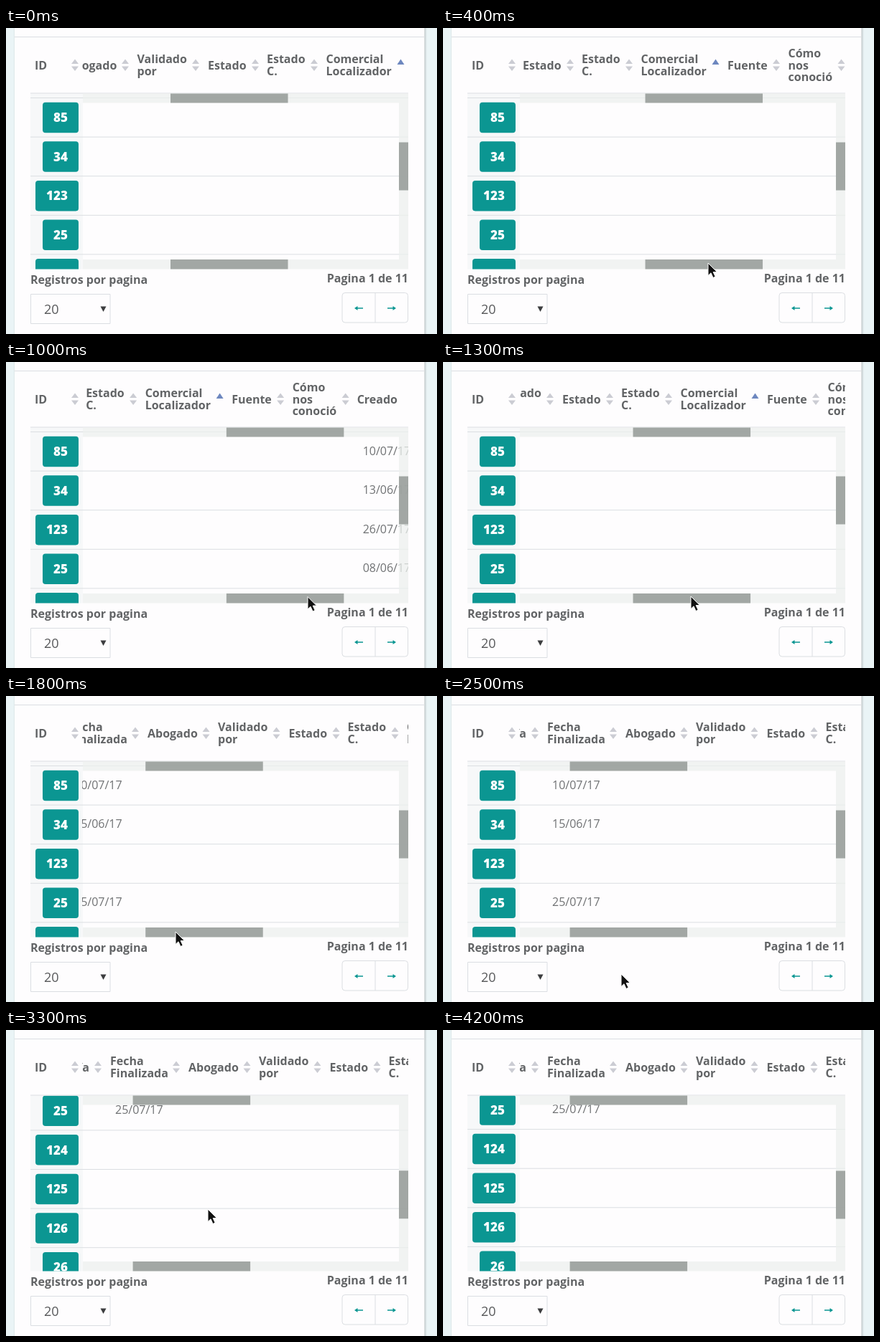
An HTML page that plays this animation: 600 by 427 pixels, repeating every 4300 ms.

```html
<!DOCTYPE html>
<html lang="es">
<head>
<meta charset="utf-8">
<style>
html, body { margin: 0; width: 100%; height: 100%; overflow: hidden; background: #eaf4f6; }
svg { display: block; width: 600px; height: 427px; font: 16px "Open Sans", sans-serif; fill: #707274; }
.b { font-weight: 700; fill: #626466; }
.chip { fill: #0b9692; }
.num { font-weight: 800; font-size: 17px; fill: #fff; text-anchor: middle; }
.line { fill: none; stroke: #dbdee2; }
.track { fill: #edf1ee; fill-opacity: .75; }
.thumb { fill: #959a97; fill-opacity: .85; }
.sort { fill: #cbccd3; }
.up { fill: #6d87bf; }
.card { fill: #fefdfe; filter: drop-shadow(1px 0 1.5px #0004); }
</style>
</head>
<body>
<svg viewBox="0 0 600 427">
  <clipPath id="head"><path d="M106 14H560V91H106z"/></clipPath>
  <clipPath id="body"><path d="M34 91.5H560V336.5H34z"/></clipPath>
  <clipPath id="cells"><path d="M106 91.5H560V336.5H106z"/></clipPath>

  <rect class="card" x="12" y="-9" width="570.5" height="450"/>
  <path class="line" d="M12 12.5H582"/>

  <text class="b" x="40" y="57.5">ID</text>
  <path class="sort" d="M91 50l5-6.5 5 6.5zM91 53.5h10l-5 6.5z"/>
  <g clip-path="url(#head)"><g id="heads"></g></g>

  <g clip-path="url(#body)">
    <path fill="#f7f8f9" d="M34 91H107V337H34z"/>
    <g id="rows"></g>
  </g>
  <g clip-path="url(#cells)"><g id="dates"></g></g>
  <path class="line" d="M34 91H560"/>

  <path class="track" d="M107 91.5H560V104.5H107zM107 323H560V336.5H107zM547 104.5H560V323H547z"/>
  <path class="thumb" id="hbar" d="M0 91.5H163.5V104.5H0zM0 323H163.5V336.5H0z"/>
  <path class="thumb" id="vbar" d="M547 0H560V67H547z"/>

  <text class="b" x="34" y="356.5">Registros por pagina</text>
  <text class="b" x="560" y="354.5" text-anchor="end">Pagina 1 de 11</text>
  <path class="line" d="M34.5 371.5H145V412.5H34.5z"/>
  <text x="53" y="399" font-size="18" fill="#58595b">20</text>
  <path fill="#3c3d3f" d="M131.5 388.5h8l-4 7.5z"/>
  <rect class="line" x="468" y="369.5" width="91.5" height="41.5" rx="4"/>
  <path class="line" d="M514 369.5V411"/>
  <path class="chip" d="M485 391l4.500-3v2.300h7.500v1.400h-7.500v2.300zM543 391l-4.500-3v2.300h-7.500v1.400h7.500v2.300z"/>

  <path id="cursor" fill="#111" stroke="#fff" d="M0 0V17.500L4 13.800 7 20.500 10.200 19 7.200 12.600H12.500z"/>
</svg>
<script>
const LOOP = 4300, STEP = 100, ROW_H = 54.6, TOP = 97.5;
const $ = id => document.getElementById(id);
const text = (x, y, s, cls = "", anchor = "start") =>
  `<text x="${x}" y="${y}" class="${cls}" text-anchor="${anchor}">${s}</text>`;

// label lines, text x, sort icon centre
const columns = [
  ["Fecha Finalizada", -24.5, 67.5], ["Abogado", 84.5, 166], ["Validado por", 182.5, 264],
  ["Estado", 281, 347], ["Estado C.", 363, 429], ["Comercial Localizador", 445.5, 549.5],
  ["Fuente", 566, 634], ["Cómo nos conoció", 650.5, 724.5], ["Creado", 740.5, 817.5],
  ["Modificado", 834.5, 945]
];
const sortIcon = x => `<path class="sort" d="M${x - 5} 50l5-6.500 5 6.500zM${x - 5} 53.500h10l-5 6.500z"/>`;
const upIcon = x => `<path class="up" d="M${x - 5} 51l5-7.500 5 7.500z"/>`;

$("heads").innerHTML = text(-53.5, 57.5, "Categoría", "b", "end") + sortIcon(-41.5) +
  columns.map(([label, x, icon]) => {
    const lines = label.split(" ");
    return lines.map((s, i) => text(x, 57.5 + (i - (lines.length - 1) / 2) * 16.5, s, "b")).join("") +
      (label.startsWith("Comercial") ? upIcon(icon) : sortIcon(icon));
  }).join("");

// id, finished, created, modified
const rows = [
  ["85", "10/07/17", "10/07/17", "25/07/17"],
  ["34", "15/06/17", "13/06/17", "26/07/17"],
  ["123", "", "26/07/17", "26/07/17"],
  ["25", "25/07/17", "08/06/17", "26/07/17"],
  ["124"], ["125"], ["126"], ["26"]
];
const dateX = [-17.5, 748.5, 841.5];

$("rows").innerHTML = rows.map(([id], i) => {
  const y = TOP + i * ROW_H, w = id.length > 2 ? 60 : 50;
  return `<path class="line" d="M34 ${y}H560"/>
    <rect class="chip" x="${101 - w}" y="${y + 6.2}" width="${w}" height="42.500" rx="4"/>
    <text class="num" x="${101 - w / 2}" y="${y + 33.7}">${id}</text>`;
}).join("");

$("dates").innerHTML = rows.map(([, ...dates], i) =>
  dates.map((d, k) => text(dateX[k], TOP + i * ROW_H + 32, d)).join("")).join("");

// keys: [time, value], linear between
const track = keys => t => {
  const i = keys.findIndex(k => k[0] > t);
  if (i < 0) return keys[keys.length - 1][1];
  if (!i) return keys[0][1];
  const [t0, a] = keys[i - 1], [t1, b] = keys[i];
  return a + (b - a) * (t - t0) / (t1 - t0);
};
const scrollX = track([[0, 0], [700, 297.5], [900, 297.5], [1300, 115], [1800, -112.5], [2000, -169.5]]);
const scrollY = track([[2800, 0], [3300, 176], [3400, 177.3]]);
const cursorX = track([[100, 293], [700, 445], [900, 445], [1300, 345], [1800, 236], [2000, 211], [2200, 211], [2500, 248], [2700, 250], [3000, 281]]);
const cursorY = track([[700, 328], [1300, 327], [1800, 329], [2200, 329], [2500, 388], [2700, 384], [3000, 260], [3300, 250]]);

const move = (id, x, y) => $(id).setAttribute("transform", `translate(${x} ${y})`);

function draw(now) {
  const t = Math.floor(now % LOOP / STEP) * STEP;
  const x = scrollX(t), y = scrollY(t);
  move("heads", -x, 0);
  move("dates", -x, -y);
  move("rows", 0, -y);
  move("hbar", 229 + x / 3.235, 0);
  move("vbar", 0, 159.5 + y * .209);
  move("cursor", cursorX(t), cursorY(t));
  $("cursor").style.display = t >= 100 && t < 4000 ? "" : "none";
}

let start;
requestAnimationFrame(function tick(now) {
  start ??= now;
  draw(now - start);
  requestAnimationFrame(tick);
});
</script>
</body>
</html>
```
